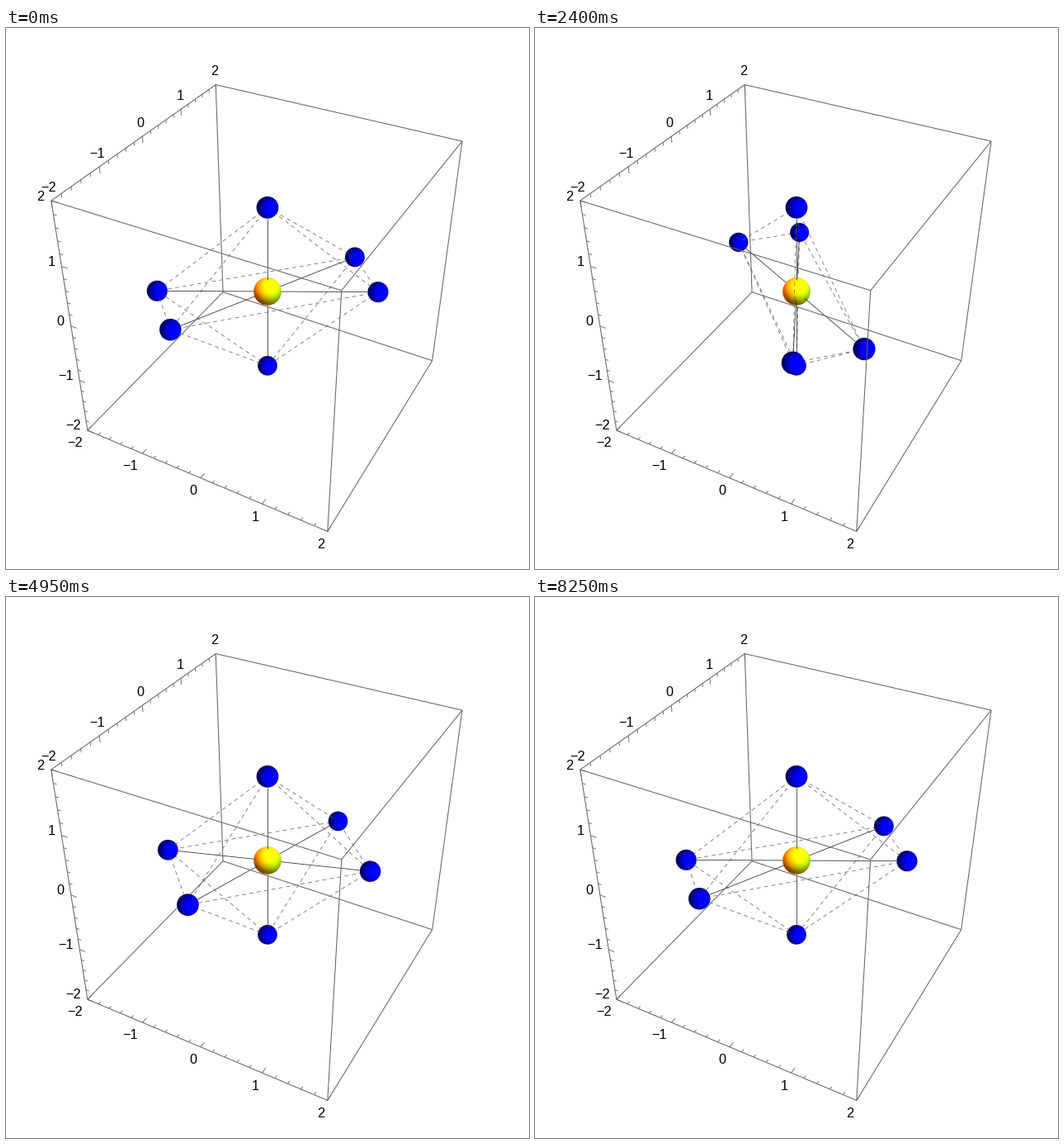
A matplotlib script that plays this animation: 634x655 px, repeating every 9 s.

```python
from itertools import combinations, product

import matplotlib.pyplot as plt
import numpy as np
from matplotlib.animation import FuncAnimation
from matplotlib.collections import LineCollection

W, H, DPI = 634, 655, 100
PX = 72 / DPI                       # one pixel in points
FRAMES, INTERVAL, HOLD = 60, 150, 5
CYCLE = 24.5                        # frames per vibration
AMPLITUDE, BOND = 0.75, np.sqrt(2)
CORE_R, ATOM_R = 0.2, 0.15

# Camera
EYE = 4 * np.array([1.3, -2.4, 2.0])
DIST = np.linalg.norm(EYE)
BACK = EYE / DIST
RIGHT = np.cross([0, 0, 1], BACK)
RIGHT /= np.linalg.norm(RIGHT)
UP = np.cross(BACK, RIGHT)
FOCAL, CX, CY = 1132, 317, 319


def depth(p):
    return DIST - np.asarray(p) @ BACK


def project(p):
    p = np.asarray(p, float)
    k = FOCAL / depth(p)
    return np.stack([CX + k * (p @ RIGHT), CY - k * (p @ UP)], -1)


# Coloured lights in view space: direction, colour
AMBIENT = np.array([0.4, 0.2, 0.2])
LIGHTS = [
    ((1.5, -0.5, 1.5), (0, 0.18, 0.5)),
    ((1.5, 1.5, 2.5), (0.18, 0.5, 0.18)),
    ((-0.5, 1.5, 1.5), (0.5, 0.18, 0)),
    ((-0.5, -0.5, 1.5), (0, 0, 0.18)),
]
GAIN = 1.2
BLUE, YELLOW = (0, 0, 1), (1, 1, 0)
PATCH = 40


def shade(cx, cy, r, color):
    """RGBA patch of a lit ball and its extent on whole pixels."""
    x0, y0 = int(cx) - PATCH // 2, int(cy) - PATCH // 2
    ys, xs = np.mgrid[0:PATCH, 0:PATCH] + 0.5
    nx, ny = (xs + x0 - cx) / r, -(ys + y0 - cy) / r
    rho = np.hypot(nx, ny)
    over = np.maximum(rho, 1)
    nx, ny = nx / over, ny / over
    nz = np.sqrt(np.clip(1 - nx**2 - ny**2, 0, 1))
    normal = np.stack([nx, ny, nz], -1)
    light = np.tile(AMBIENT, (PATCH, PATCH, 1))
    for direction, tint in LIGHTS:
        d = np.array(direction) / np.linalg.norm(direction)
        light += np.clip(normal @ d, 0, None)[..., None] * np.array(tint)
    rgba = np.ones((PATCH, PATCH, 4))
    rgba[..., :3] = np.clip(GAIN * light * np.array(color), 0, 1)
    rgba[..., 3] = np.clip((1 - rho) * r + 0.5, 0, 1)
    return rgba, (x0, x0 + PATCH, y0 + PATCH, y0)


def visible(points, balls):
    """True where no ball lies between the eye and the point."""
    ray = points - EYE
    length = np.linalg.norm(ray, axis=1)
    ray = ray / length[:, None]
    shown = np.ones(len(points), bool)
    for centre, r in balls:
        m = centre - EYE
        along = ray @ m
        gap = r**2 - (m @ m - along**2)
        near = along - np.sqrt(np.maximum(gap, 0))
        shown &= ~((gap > 0) & (near < length - 0.002))
    return shown


def strokes(a, b, balls, dash=None):
    """Visible screen pieces of the 3D segment a-b."""
    a, b = np.asarray(a, float), np.asarray(b, float)
    pa, pb = project([a, b])
    span = np.linalg.norm(pb - pa)
    t = np.linspace(0, 1, max(int(4 * span), 8))
    wa, wb = (1 - t) / depth(a), t / depth(b)
    s = (wb / (wa + wb))[:, None]
    shown = visible(a + (b - a) * s, balls)
    if dash:
        shown &= (t * span) % sum(dash) < dash[0]
    flips = np.diff(np.r_[0, shown.astype(int), 0])
    starts, ends = np.flatnonzero(flips == 1), np.flatnonzero(flips == -1) - 1
    return [(pa + (pb - pa) * t[i], pa + (pb - pa) * t[j])
            for i, j in zip(starts, ends) if j > i]


def atoms_at(n):
    k = min(max(n, HOLD), FRAMES - 1 - HOLD) - HOLD
    q = AMPLITUDE * np.cos(2 * np.pi * k / CYCLE)
    half = np.array([[0, 0, BOND], [BOND, q, 0], [q, BOND, 0]])
    return np.concatenate([half, -half])


CORNERS = np.array(list(product((-2, 2), repeat=3)))
BOX = [(a, b) for a, b in combinations(CORNERS, 2) if np.sum(a != b) == 1]
EDGES = [(i, j) for i, j in combinations(range(6), 2) if j - i != 3]

fig = plt.figure(figsize=(W / DPI, H / DPI), dpi=DPI, facecolor="white")
ax = fig.add_axes([0, 0, 1, 1])
ax.axis("off")

balls_art = [ax.imshow(np.zeros((PATCH, PATCH, 4)), interpolation="nearest",
                       aspect="auto") for _ in range(7)]
ax.set_xlim(0, W)
ax.set_ylim(H, 0)


def line_set(color, width, z):
    art = LineCollection([], colors=color, linewidths=width * PX,
                         capstyle="butt", zorder=z)
    return ax.add_collection(art, autolim=False)


box_art = line_set("#666666", 1.05, 52)
bond_art = line_set("#303030", 0.8, 51)
dash_art = line_set("#606060", 0.75, 50)
tick_art = line_set("#666666", 0.9, 53)


def ticks(place, inward):
    """Ticks every 0.2 along an edge, longer ones at whole numbers."""
    out = []
    for i in range(-10, 11):
        p = np.array(place(i / 5), float)
        size = 0.1 if i % 5 == 0 else 0.055
        out.append(project([p, p + size * np.array(inward)]))
    return out


tick_art.set_segments(
    ticks(lambda v: (v, -2, -2), (0, 1, 0))
    + ticks(lambda v: (-2, v, 2), (0, 0, -1))
    + ticks(lambda v: (-2, -2, v), (1, 0, 0)))

# Label centres from -2 to 2 on each axis
LABELS = [
    [(84, 501), (151, 529), (227, 559), (302, 591), (382, 624)],
    [(52, 192), (110, 151), (163, 114), (211, 81), (253, 51)],
    [(82, 480), (72, 420), (66, 354), (55, 282), (42, 203)],
]
for row in LABELS:
    for value, (x, y) in zip(range(-2, 3), row):
        ax.text(x, y + 5.8, str(value).replace("-", "\u2212"), ha="center",
                va="baseline", family="Liberation Sans", fontsize=16.3 * PX,
                color="black", zorder=60)


def draw(n):
    atoms = atoms_at(n)
    core = np.zeros(3)
    balls = [(core, CORE_R)] + [(p, ATOM_R) for p in atoms]
    for art, (p, r) in zip(balls_art, balls):
        x, y = project(p)
        d = depth(p)
        rgba, extent = shade(x, y, r * FOCAL / d,
                             YELLOW if p is core else BLUE)
        art.set_data(rgba)
        art.set_extent(extent)
        art.set_zorder(30 - d)
    box_art.set_segments([s for a, b in BOX for s in strokes(a, b, balls)])
    bond_art.set_segments([s for p in atoms for s in strokes(core, p, balls)])
    dash_art.set_segments([s for i, j in EDGES
                           for s in strokes(atoms[i], atoms[j], balls, (5, 4))])
    return [*balls_art, box_art, bond_art, dash_art]


anim = FuncAnimation(fig, draw, frames=FRAMES, interval=INTERVAL,
                     init_func=lambda: draw(0), repeat=True, blit=False)
plt.show()
```
